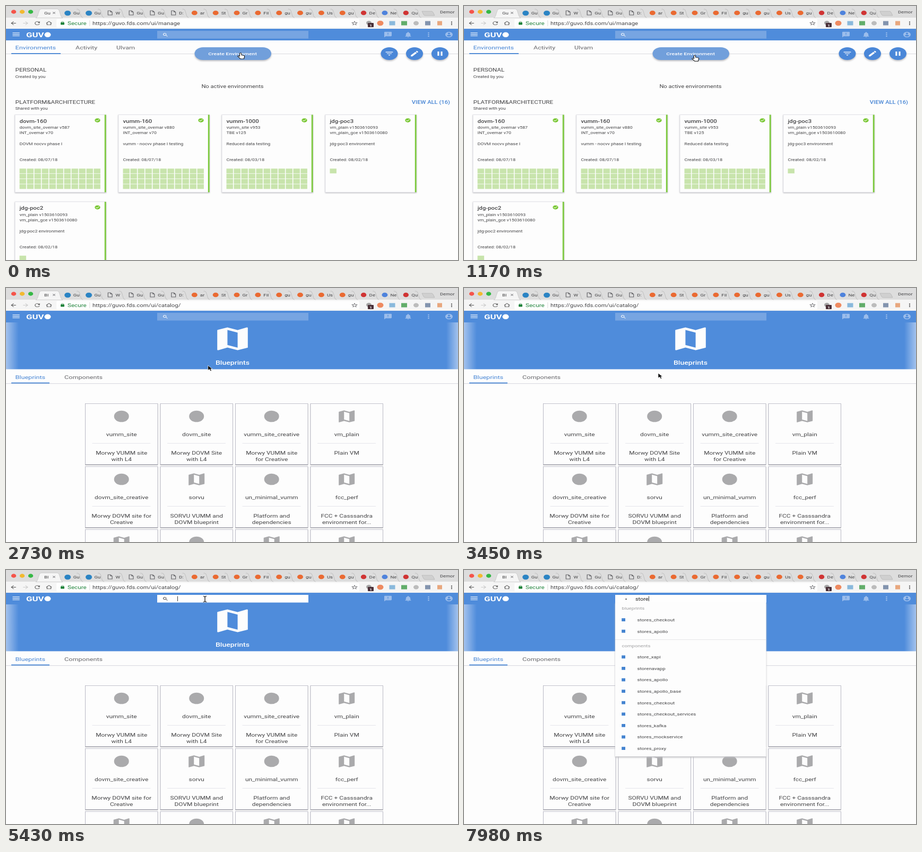
Recreate the animation shown at these times as an HTML page. Size 852 by 480 pixels, loop 8 s.

```html
<!DOCTYPE html>
<html lang="en">
<head>
<meta charset="utf-8">
<title>Create environment</title>
<style>
  html, body { margin: 0; width: 100%; height: 100%; overflow: hidden; background: #fdfdfd; }
  svg { display: block; width: 100vw; height: 100vh; font-family: Roboto, Arial, sans-serif; }
  .card { fill: #fdfdfd; stroke: #e2e2e8; stroke-width: .8; filter: drop-shadow(0 1.2px 1px #b4b4b8); }
  .tile { fill: #fdfdfd; stroke: #b4b4c0; stroke-width: .8; filter: drop-shadow(.3px 1.2px .7px #a2a2a6); }
  .lift { filter: drop-shadow(0 2px 1.5px #bcbcc0); }
</style>
</head>
<body>
<svg id="stage" viewBox="0 0 852 480" preserveAspectRatio="none"></svg>
<script>
// Screen pixels are shown at this size on the stage.
const SX = 0.8, SY = 0.6, LOOP = 8000;
const INK = '#444446', SOFT = '#66666a', BLUE = '#4f8cdb', LINK = '#4584d4', PAPER = '#fdfdfd';
const GREY = '#aaaaac', PALE = '#9bbdec', FIELD = '#77a5e2';

const ICON = {
  map: 'M20.5 3l-.16.03L15 5.1 9 3 3.36 4.9c-.21.07-.36.25-.36.48V20.5c0 .28.22.5.5.5l.16-.03L9 18.9l6 2.1 5.64-1.9c.21-.07.36-.25.36-.48V3.5c0-.28-.22-.5-.5-.5zM15 19l-6-2.11V5l6 2.11z',
  menu: 'M3 18h18v-2H3zM3 13h18v-2H3zM3 6v2h18V6z',
  search: 'M9.5 3a6.5 6.5 0 1 0 4.2 11.4l.3.3v.8l5 5 1.5-1.5-5-5h-.8l-.3-.3A6.5 6.5 0 0 0 9.5 3zm0 2a4.5 4.5 0 1 1 0 9 4.5 4.5 0 0 1 0-9z',
  filter: 'M10 18h4v-2h-4zM3 6v2h18V6zM6 13h12v-2H6z',
  edit: 'M3 17.25V21h3.75L17.81 9.94l-3.75-3.75zM20.71 7.04a1 1 0 0 0 0-1.41l-2.34-2.34a1 1 0 0 0-1.41 0l-1.83 1.83 3.75 3.75z',
  pause: 'M6 19h4V5H6zM14 5v14h4V5z',
  check: 'M12 2a10 10 0 1 0 0 20 10 10 0 0 0 0-20zm-2 15l-5-5 1.41-1.41L10 14.17l7.59-7.59L19 8z',
  chat: 'M20 2H4c-1.1 0-2 .9-2 2v18l4-4h14c1.1 0 2-.9 2-2V4c0-1.1-.9-2-2-2zm-7 12h-2v-2h2zm0-4h-2V6h2z',
  bell: 'M12 22c1.1 0 2-.9 2-2h-4c0 1.1.9 2 2 2zm6-6v-5c0-3.07-1.64-5.64-4.5-6.32V4a1.5 1.5 0 0 0-3 0v.68C7.63 5.36 6 7.92 6 11v5l-2 2v1h16v-1z',
  dots: 'M12 8a2 2 0 1 0 0-4 2 2 0 0 0 0 4zm0 2a2 2 0 1 0 0 4 2 2 0 0 0 0-4zm0 6a2 2 0 1 0 0 4 2 2 0 0 0 0-4z',
  account: 'M12 2a10 10 0 1 0 0 20 10 10 0 0 0 0-20zm0 3a3 3 0 1 1 0 6 3 3 0 0 1 0-6zm0 14.2a7.2 7.2 0 0 1-6-3.22c.03-1.99 4-3.08 6-3.08s5.97 1.09 6 3.08a7.2 7.2 0 0 1-6 3.22z',
  person: 'M12 2a2 2 0 1 1 0 4 2 2 0 0 1 0-4zm9 7h-6v13h-2v-6h-2v6H9V9H3V7h18z',
  back: 'M20 11H7.83l5.59-5.59L12 4l-8 8 8 8 1.41-1.41L7.83 13H20z',
  forward: 'M4 11h12.17l-5.59-5.59L12 4l8 8-8 8-1.41-1.41L16.17 13H4z',
  reload: 'M17.65 6.35A8 8 0 1 0 19.73 14h-2.08A6 6 0 1 1 12 6c1.66 0 3.14.69 4.22 1.78L13 11h7V4z',
  home: 'M12 3L2 12h3v8h14v-8h3zm0 2.6l5 4.5V18H7v-7.9z',
  lock: 'M18 8h-1V6A5 5 0 0 0 7 6v2H6a2 2 0 0 0-2 2v10a2 2 0 0 0 2 2h12a2 2 0 0 0 2-2V10a2 2 0 0 0-2-2zM9 8V6a3 3 0 0 1 6 0v2z',
  star: 'M22 9.24l-7.19-.62L12 2 9.19 8.63 2 9.24l5.46 4.73L5.82 21 12 17.27 18.18 21l-1.63-7.03zM12 15.4l-3.76 2.27 1-4.28-3.32-2.88 4.38-.38L12 6.1l1.71 4.04 4.38.38-3.32 2.88 1 4.28z',
  page: 'M5 2h9l6 6v14H5zm2 2v16h11V9h-5V4z',
  close: 'M19 6.4L17.6 5 12 10.6 6.4 5 5 6.4l5.6 5.6L5 17.6 6.4 19l5.6-5.6 5.6 5.6 1.4-1.4-5.6-5.6z'
};

const rect = (x, y, w, h, fill, more = '') => `<rect x="${x}" y="${y}" width="${w}" height="${h}" fill="${fill}" ${more}/>`;
const oval = (x, y, rx, ry, fill, more = '') => `<ellipse cx="${x}" cy="${y}" rx="${rx}" ry="${ry}" fill="${fill}" ${more}/>`;
const path = (d, fill, more = '') => `<path d="${d}" fill="${fill}" ${more}/>`;
const group = (id, body) => `<g id="${id}">${body}</g>`;
const icon = (name, x, y, size, fill) => path(ICON[name], fill,
  `fill-rule="evenodd" transform="translate(${x} ${y}) scale(${SX * size / 24} ${SY * size / 24}) translate(-12 -12)"`);
const text = (x, y, str, size, { fill = INK, weight = 400, anchor = 'start', id = '' } = {}) =>
  `<text ${id && `id="${id}"`} transform="translate(${x} ${y}) scale(${SX} ${SY})" font-size="${size}" font-weight="${weight}" fill="${fill}" text-anchor="${anchor}">${str.replace(/&/g, '&amp;')}</text>`;

function browser() {
  const labels = 'Gu Gu W Gu Gu D: ar St Gr Fil gu gu Us gu De Ne Qu'.split(' ');
  const favicon = (i, x) => {
    if (i < 2) return oval(x, 13.5, 6, 4.8, '#2b84c4');
    if (i < 6) return icon('page', x, 13, 18, SOFT);
    if (i < 14) return oval(x, 13, 5.5, 4.3, '#ea6a32');
    return i === 15 ? oval(x, 13, 5.5, 4.3, '#4f83dc') : oval(x, 13, 5.2, 4.3, '#d03434');
  };
  let s = rect(0, 0, 852, 23, '#dddddd') + rect(0, 22, 852, 21, '#f5f5f5');
  ['#f5544a', '#f2b92f', '#35b845'].forEach((c, i) => { s += oval(14.5 + 16 * i, 11, 4.7, 3.7, c); });
  s += path('M56 22.5Q59 22 61 14L63 8Q64 5.5 67 5.5H96Q99 5.5 100 8L102 14Q104 22 107 22.5Z', '#f5f5f5', 'stroke="#bbbbbb" stroke-width=".6"');
  s += text(72, 16, 'Gu', 12, { id: 'tabName' }) + icon('close', 90.5, 13, 11, SOFT);
  labels.forEach((label, i) => {
    const x = 116.2 + 39.85 * i;
    s += favicon(i, x) + text(x + 10.5, 16, label, 12);
    s += path(`M${x + 17} 6H${x + 19}Q${x + 22} 6 ${x + 23} 11L${x + 25} 18Q${x + 26} 22 ${x + 29} 22`, 'none', 'stroke="#b2b2b2" stroke-width=".7"');
  });
  s += path('M784 10H802Q804 10 805 12L808 18H790Q788 18 787 16Z', '#d0d0d0', 'stroke="#b2b2b2" stroke-width=".7"');
  s += text(818, 14, 'Demor', 11.6);

  s += icon('back', 14, 32.5, 18, '#555555') + icon('forward', 37, 32.5, 18, '#c9c9c9');
  s += icon('reload', 59, 32.5, 18, '#555555') + icon('home', 81, 32.5, 18, '#555555');
  s += rect(95, 24.5, 571, 16, '#fefefe', 'rx="2"');
  s += icon('lock', 106.5, 32.2, 13, '#21843c') + text(116, 36, 'Secure', 14.6, { fill: '#21843c' });
  s += rect(157.5, 27, .7, 11, '#cccccc') + text(163, 36, '', 14.2, { id: 'address' });
  s += icon('star', 657, 32.5, 18, SOFT);
  s += oval(684, 32, 5, 4, '#a5a5a5') + rect(682, 32, 11, 8, '#4a3038', 'rx="1"');
  s += text(687.5, 38.6, '1', 10, { fill: '#fff', anchor: 'middle', weight: 700 });
  s += oval(705.5, 32.5, 6, 4.8, '#ee8a60') + rect(722.5, 28.5, 11, 8, '#8ab9dc') + rect(745, 28.5, 11, 8, '#62ad6a');
  s += oval(773, 32.5, 5, 4, '#bcbcbc') + rect(790, 28.5, 10, 8, '#8394ae') + rect(813, 28.5, 9, 8, '#e8a77e');
  return s + icon('dots', 840, 32.5, 18, '#555555');
}

function appBar() {
  let s = rect(0, 43, 852, 22, BLUE) + icon('menu', 19, 53.5, 22, '#fff');
  s += text(38, 59, 'GUV', 21, { fill: '#fff', weight: 700 }) + oval(78.5, 54.3, 6, 4.8, '#fff');
  return s + icon('chat', 720, 54, 21, PALE) + icon('bell', 758, 54, 21, PALE) +
    icon('dots', 796.5, 54, 21, PALE) + icon('account', 835, 54, 21, PALE);
}

const searchBox = () =>
  group('field', rect(285, 47, 285, 14.5, FIELD)) +
  group('lens', icon('search', 300.5, 54.5, 15, 'currentColor')) + group('dot', oval(305.5, 55, 1.3, 1.1, '#333')) +
  text(323, 57.5, '', 13.6, { id: 'typed', fill: '#222' }) + rect(323, 49.5, .9, 9.5, '#222', 'id="caret"');

function managePage() {
  let s = rect(0, 65, 852, 415, PAPER) + rect(0, 90, 852, .8, '#d2d2da') + rect(10, 89, 93, 1.8, LINK);
  s += text(17.5, 81.5, 'Environments', 15.7, { fill: LINK });
  s += text(131, 81.5, 'Activity', 15.7, { fill: SOFT }) + text(208, 81.5, 'Ulvam', 15.7, { fill: SOFT });
  s += rect(355.5, 78, 144.5, 24, '#719fdb', 'rx="16" ry="12" class="lift"');
  s += text(427, 93, 'Create Environment', 13, { fill: '#fdfdff', weight: 500, anchor: 'middle' });
  [['filter', 722.5], ['edit', 770], ['pause', 818]].forEach(([name, x]) => {
    s += oval(x, 90, 16, 12, '#4a87d8', 'class="lift"') + icon(name, x, 90, 23, '#fff');
  });
  s += text(17.5, 124, 'PERSONAL', 14.7) + text(17.5, 136, 'Created by you', 10.8);
  s += text(427, 154.5, 'No active environments', 14, { anchor: 'middle' });
  s += text(17.5, 184.5, 'PLATFORM&ARCHITECTURE', 14.7) + text(17.5, 196, 'Shared with you', 10.8);
  s += text(837, 184.5, 'VIEW ALL (16)', 14, { fill: LINK, weight: 500, anchor: 'end' });

  const machine = ['vm_plain v1503610093', 'vm_plain_gce v1503610080'];
  const cards = [
    ['dovm-160', 'dovm_site_ovemar v587', 'INT_ovemar v70', 'DOVM nocvv phase I', '08/07/18', true],
    ['vumm-160', 'vumm_site_ovemar v880', 'INT_ovemar v70', 'vumm - nocvv phase I testing', '08/07/18', true],
    ['vumm-1000', 'vumm_site v953', 'TBE v125', 'Reduced data testing', '08/03/18', true],
    ['jdg-poc3', ...machine, 'jdg-poc3 environment', '08/02/18', false],
    ['jdg-poc2', ...machine, 'jdg-poc2 environment', '08/02/18', false]
  ];
  cards.forEach(([name, line1, line2, about, date, full], i) => {
    const x = 17 + 195 * (i % 4), y = i < 4 ? 205.5 : 370, tx = x + 8.5;
    s += rect(x, y, 171.5, 146.5, '', 'class="card"') + rect(x + 168.8, y, 2.8, 146.5, '#7cc93c');
    s += text(tx, y + 15, name, 14.2, { weight: 500 }) + icon('check', x + 155.5, y + 10.5, 15.5, '#78c732');
    [[line1, 26.5], [line2, 36.7], [about, 57.8], ['Created: ' + date, 87.5]].forEach(([str, dy]) => { s += text(tx, y + dy, str, 11); });
    for (let n = 0; n < (full ? 44 : 1); n++)
      s += rect(tx + n % 11 * 14, y + 101.8 + Math.floor(n / 11) * 9.8, 12.4, 9, '#c8e4ac');
  });
  return s;
}

function catalogPage() {
  let s = rect(0, 65, 852, 415, PAPER) + rect(0, 65, 852, 88.5, 'url(#hero)');
  s += icon('map', 427, 96, 96, '#fdfdfd') + text(427, 144.5, 'Blueprints', 17.6, { fill: '#fff', weight: 500, anchor: 'middle' });
  s += text(17.5, 172, 'Blueprints', 15.8, { fill: LINK }) + text(110, 172, 'Components', 15.8, { fill: SOFT });
  s += rect(0, 180.3, 852, .8, '#ccccd6') + rect(10, 178.6, 72, 1.8, LINK);
  const tiles = [
    ['disc', 'vumm_site', 'Morwy VUMM site', 'with L4'], ['disc', 'dovm_site', 'Morwy DOVM Site', 'with L4'],
    ['disc', 'vumm_site_creative', 'Morwy VUMM site', 'for Creative'], ['map', 'vm_plain', 'Plain VM', ''],
    ['disc', 'dovm_site_creative', 'Morwy DOVM site for', 'Creative'], ['map', 'sorvu', 'SORVU VUMM and', 'DOVM blueprint'],
    ['disc', 'un_minimal_vumm', 'Platform and', 'dependencies'], ['map', 'fcc_perf', 'FCC + Casssandra', 'environment for...'],
    ['map', '', '', ''], ['disc', '', '', ''], ['map', '', '', ''], ['map', '', '', '']
  ];
  tiles.forEach(([mark, name, line1, line2], i) => {
    const x = 149.5 + 141.5 * (i % 4), y = 218.5 + 119 * Math.floor(i / 4), mid = x + 68.2;
    s += rect(x, y, 136.5, 115, '', 'class="tile"');
    s += mark === 'map' ? icon('map', mid, y + 24, 50, GREY) : oval(mid, y + 24, 14, 10.8, GREY);
    s += rect(x + 13, y + 74.6, 110, .7, '#dcdce4');
    [[name, 61], [line1, 96], [line2, 108.7]].forEach(([str, dy]) => {
      s += text(mid, y + dy, str, 14.9, { anchor: 'middle' });
    });
  });
  return s;
}

function results(id, sections) {
  const maxBottom = 367;
  let y = 72.4, body = '';
  sections.forEach(([title, items], i) => {
    if (i) { body += rect(285, y + 15.7, 284, .8, '#dedee2'); y += 27; }
    body += text(297.5, y + 3, title, 12.1, { fill: '#a0a0a2' });
    items.split(' ').forEach(item => {
      y += 21.6;
      body += item === 'Support' ? icon('person', 307, y, 24, '#555558') : rect(297.2, y - 2.8, 6.8, 5.8, '#4383d0');
      body += text(326.5, y + 3, item, 12.1);
    });
  });
  const bottom = Math.min(y + 15.3, maxBottom);
  return group(id, rect(285, 61, 284.5, bottom - 61, PAPER, 'class="lift"') + `<g clip-path="url(#panel)">${body}</g>`);
}

const cursors =
  path('M-2 1Q0-2 2 1V6L8 7.5Q10 8 9.5 11L8 18H0L-6 11Q-7 8-4 9L-2 10Z', '#fff', 'id="hand" stroke="#111" stroke-width="1.4"') +
  path('M0 0V15L3.5 11.8 6 17.5 8.5 16.4 6 11H10.5Z', '#000', 'id="arrow" stroke="#fff" stroke-width="1"') +
  path('M-4-9Q0-9 0-6Q0-9 4-9M0-6V6M-4 9Q0 9 0 6Q0 9 4 9', 'none', 'id="beam" stroke="#111" stroke-width="1.6"');

document.getElementById('stage').innerHTML =
  `<defs><linearGradient id="hero"><stop offset="0" stop-color="#a3c2ed"/><stop offset=".028" stop-color="${BLUE}"/>` +
  `<stop offset=".974" stop-color="${BLUE}"/><stop offset="1" stop-color="#a3c2ed"/></linearGradient>` +
  `<clipPath id="panel">${rect(285, 61, 284.5, 306, '#fff')}</clipPath></defs>` +
  group('manage', managePage()) + group('catalog', catalogPage()) + browser() + appBar() +
  results('broad', [
    ['guvo_functionality', 'Support'], ['environments', 'security-etap-1'],
    ['blueprints', 'sorvu sitedb_standalone sorvu_stella site_kafka sorvu_db_standalone stores_checkout spark_cluster saturn search_insight']
  ]) +
  results('narrow', [
    ['blueprints', 'stores_checkout stores_apollo'],
    ['components', 'store_xapi storenavapp stores_apollo stores_apollo_base stores_checkout stores_checkout_services stores_kafka stores_mockservice stores_proxy']
  ]) + searchBox() + group('pointer', cursors);

const el = id => document.getElementById(id);
const show = (id, on) => { el(id).style.display = on ? '' : 'none'; };

const AT = { catalog: 1720, focus: 5000, broad: 6400, loading: 7700, narrow: 7800 };
const KEYS = [[6150, 's'], [6600, 't'], [7250, 'o'], [7400, 'r'], [7650, 'e']];
const PATH = [[0, 442, 89], [300, 442, 89], [900, 435, 93.5], [2100, 434.5, 93], [3000, 366, 161], [3900, 366, 161], [4700, 375, 55], [LOOP, 375, 55]];

function pointerAt(t) {
  const i = PATH.findIndex(([time]) => time > t);
  const [t0, x0, y0] = PATH[i - 1], [t1, x1, y1] = PATH[i];
  const k = (t - t0) / (t1 - t0), e = k * k * (3 - 2 * k);
  return [x0 + (x1 - x0) * e, y0 + (y1 - y0) * e];
}

function draw(t) {
  const inCatalog = t >= AT.catalog, focused = t >= AT.focus;
  show('manage', !inCatalog);
  show('catalog', inCatalog);
  el('tabName').textContent = inCatalog ? 'Bl' : 'Gu';
  el('address').textContent = 'https://guvo.fds.com/ui/' + (inCatalog ? 'catalog/' : 'manage');

  const pressed = KEYS.filter(([time]) => t >= time), typed = el('typed');
  typed.textContent = pressed.map(([, key]) => key).join('');
  const sinceKey = t - (pressed.length ? pressed[pressed.length - 1][0] : AT.focus);
  el('field').firstChild.setAttribute('fill', focused ? '#fefefe' : FIELD);
  el('lens').style.color = focused ? '#444' : '#fff';
  show('lens', t < AT.loading);
  show('dot', t >= AT.loading);
  show('caret', focused && sinceKey % 1000 < 500);
  el('caret').setAttribute('x', 323 + (pressed.length ? typed.getComputedTextLength() * SX + .3 : 0));
  show('broad', t >= AT.broad && t < AT.narrow);
  show('narrow', t >= AT.narrow);

  const [x, y] = pointerAt(t), overField = y < 62;
  el('pointer').setAttribute('transform', `translate(${x} ${y}) scale(${SX} ${SY})`);
  show('pointer', !pressed.length);
  show('hand', !inCatalog);
  show('arrow', inCatalog && !overField);
  show('beam', overField);
}

const start = performance.now();
function tick() {
  draw((performance.now() - start) % LOOP);
  requestAnimationFrame(tick);
}
tick();
</script>
</body>
</html>
```
